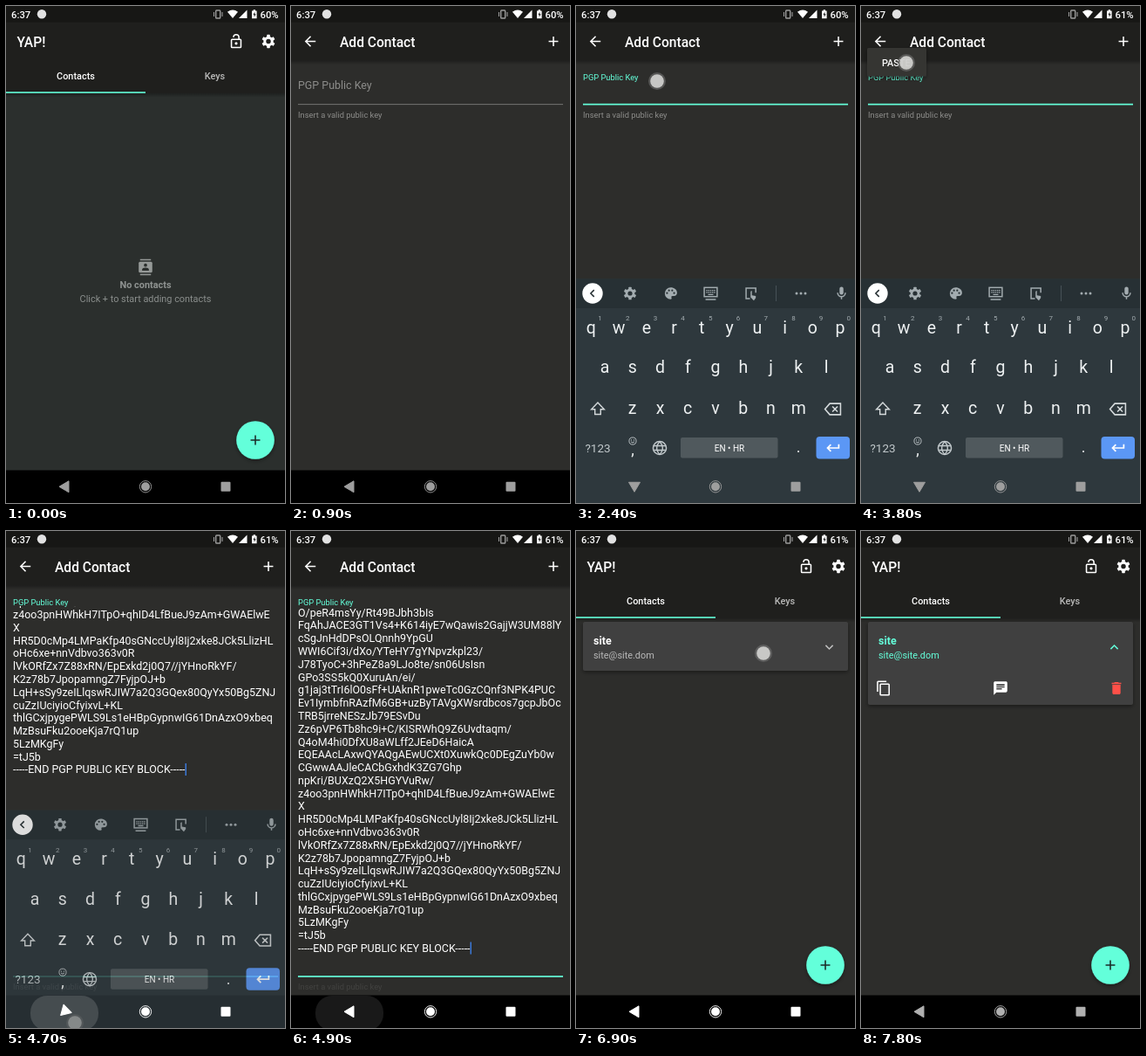
Animation of 320 by 569 pixels, one loop 8000 ms. Source, as an HTML page:

```html
<!DOCTYPE html>
<html lang="en">
<head>
<meta charset="utf-8">
<title>Adding a contact</title>
<style>
html, body { margin: 0; width: 100%; height: 100%; overflow: hidden; background: #000; }
svg { display: block; width: 100%; height: 100%; font-family: Roboto, "Liberation Sans", sans-serif; }
text { white-space: pre; }
</style>
</head>
<body>
<svg id="stage" viewBox="0 0 320 569"></svg>
<script>
const LOOP = 8000, TEAL = '#64ffda', DP = 320 / 411;
const LINE = 14.78, LAST = 493;

// ---- markup helpers: y is the middle of the capitals ----
const text = (x, y, s, size, fill, more = '') =>
  `<text x="${x}" y="${(y + size * 0.356).toFixed(2)}" font-size="${size}" fill="${fill}" ${more}>${s}</text>`;
const mid = 'text-anchor="middle"', medium = 'font-weight="500"', bold = 'font-weight="700"';
const rect = (x, y, w, h, fill, more = '') =>
  `<rect x="${x}" y="${y}" width="${w}" height="${h}" fill="${fill}" ${more}/>`;
const circle = (x, y, r, fill, more = '') => `<circle cx="${x}" cy="${y}" r="${r}" fill="${fill}" ${more}/>`;
const path = (d, more = '') => `<path d="${d}" ${more}/>`;
const line = (d, w = 2) => path(d, `fill="none" stroke="currentColor" stroke-width="${w}"`);
const icon = (x, y, body, color, scale = DP) =>
  `<g transform="translate(${x} ${y}) scale(${scale}) translate(-12 -12)" fill="${color}" color="${color}">${body}</g>`;
const group = (id, body, more = '') => `<g id="${id}" ${more}>${body}</g>`;

const tooth = i => rect(9.7, 2.2, 4.6, 4.5, 'currentColor', `rx="0.8" transform="rotate(${i * 60} 12 12)"`);
const ICON = {
  gear: [0, 1, 2, 3, 4, 5].map(tooth).join('') +
    circle(12, 12, 5.4, 'none', 'stroke="currentColor" stroke-width="3.8"'),
  lock: rect(5, 9, 14, 12, 'none', 'rx="1" stroke="currentColor" stroke-width="2"') +
    circle(12, 15, 2, 'currentColor') + line('M8 6a4 4 0 0 1 8 0v3'),
  back: path('M20 11H7.83l5.59-5.59L12 4l-8 8 8 8 1.41-1.41L7.83 13H20z'),
  add: path('M19 13h-6v6h-2v-6H5v-2h6V5h2v6h6z'),
  more: path('M16.59 8.59L12 13.17 7.41 8.59 6 10l6 6 6-6z'),
  copy: line('M3 17V3q0-1 1-1h12') + rect(7, 6, 13, 16, 'none', 'rx="1" stroke="currentColor" stroke-width="2"'),
  message: path('M20 2H4c-1.1 0-2 .9-2 2v18l4-4h14c1.1 0 2-.9 2-2V4c0-1.1-.9-2-2-2zM6 9h12v2H6zm8 5H6v-2h8zm4-6H6V6h12z',
    'fill-rule="evenodd"'),
  bin: path('M6 19c0 1.1.9 2 2 2h8c1.1 0 2-.9 2-2V7H6zM19 4h-3.5l-1-1h-5l-1 1H5v2h14z'),
  contacts: path('M4 0h16v2H4zM4 22h16v2H4z') + rect(2, 4, 20, 16, 'currentColor', 'rx="2"') +
    circle(12, 9, 2.4, '#2b2f2d') + path('M7 17v-1.5c0-4 10-4 10 0V17z', 'fill="#2b2f2d"'),
  palette: path('M12 3a9 9 0 0 0 0 18c1.5 0 2-1.3 1.4-2.4-.7-1.3.1-2.6 1.6-2.6h2a5 5 0 0 0 5-5c0-4.4-4.5-8-10-8z') +
    [[6.5, 11.5], [9.5, 7.5], [14.5, 7.5], [17.5, 11.5]].map(p => circle(p[0], p[1], 1.5, '#273034')).join(''),
  keyboard: rect(2, 3, 20, 14, 'none', 'stroke="currentColor" stroke-width="2"') +
    line('M5 7.5h14M5 10.5h14', 1.8).replace('/>', ' stroke-dasharray="2 1"/>') + line('M8 13.8h8M4 21.5h16', 1.8),
  touch: line('M10 20H4V4h15v7') + path('M11 9l2-1v7l6 1v3l-3 4-5-5z'),
  mic: rect(9, 2, 6, 12, 'currentColor', 'rx="3"') + line('M6 11a6 6 0 0 0 12 0M12 17v4'),
  shift: line('M12 3.5L3 13h5v7h8v-7h5z', 1.7),
  erase: line('M8 4.5h14.5v15H8L1.5 12zM11.5 8.5l7 7M18.5 8.5l-7 7', 1.8),
  globe: circle(12, 12, 9, 'none', 'stroke="currentColor" stroke-width="1.7"') +
    line('M12 3q-8 9 0 18M12 3q8 9 0 18M4 9h16M4 15h16', 1.6),
  enter: line('M20 7v5H5M9.5 7.5L5 12l4.5 4.5', 2),
  smile: circle(12, 12, 9, 'none', 'stroke="currentColor" stroke-width="2"') +
    circle(8.7, 9.5, 1.5, 'currentColor') + circle(15.3, 9.5, 1.5, 'currentColor') + line('M7.5 14q4.5 4.5 9 0')
};

const KEY = `DJRFNm+dpklWWP3Fo+PFkvFDsqTOwE0EXt0XuwEIA
O/peR4msYy/Rt49BJbh3bIs
FqAhJACE3GT1Vs4+K614iyE7wQawis2GajjW3UM88lY
cSgJnHdDPsOLQnnh9YpGU
WWI6Cif3i/dXo/YTeHY7gYNpvzkpl23/
J78TyoC+3hPeZ8a9LJo8te/sn06UsIsn
GPo3SS5kQ0XuruAn/ei/
g1jaj3tTrI6lO0sFf+UAknR1pweTc0GzCQnf3NPK4PUC
Ev1IymbfnRAzfM6GB+uzByTAVgXWsrdbcos7gcpJbOc
TRB5jrreNESzJb79ESvDu
Zz6pVP6Tb8hc9i+C/KISRWhQ9Z6Uvdtaqm/
Q4oM4hi0DfXU8aWLff2JEeD6HaicA
EQEAAcLAxwQYAQgAEwUCXt0XuwkQc0DEgZuYb0w
CGwwAAJleCACbGxhdK3ZG7Ghp
npKri/BUXzQ2X5HGYVuRw/
z4oo3pnHWhkH7ITpO+qhID4LfBueJ9zAm+GWAElwE
X
HR5D0cMp4LMPaKfp40sGNccUyl8Ij2xke8JCk5LlizHL
oHc6xe+nnVdbvo363v0R
lVkORfZx7Z88xRN/EpExkd2j0Q7//jYHnoRkYF/
K2z78b7JpopamngZ7FyjpOJ+b
LqH+sSy9zeILlqswRJIW7a2Q3GQex80QyYx50Bg5ZNJ
cuZzIUciyioCfyixvL+KL
thlGCxjpygePWLS9Ls1eHBpGypnwIG61DnAzxO9xbeq
MzBsuFku2ooeKja7rQ1up
5LzMKgFy
=tJ5b
-----END PGP PUBLIC KEY BLOCK-----`.split('\n');

// ---- scenes ----
const bars = h => rect(0, 0, 320, h, '#1f1f1d', 'class="bar"') + rect(0, 0, 320, 18.7, '#171715') +
  rect(0, h, 320, 5, 'url(#shade)');

const card = group('card',
  rect(8, 104, 304, 95, '#414141', 'id="cardBox" rx="2.5" filter="url(#drop)"') +
  `<g clip-path="url(#cardClip)">` +
  circle(215, 140, 0, '#fff', 'id="cardRipple"') +
  text(20, 126, 'site', 12.46, TEAL, bold + ' id="name"') +
  text(20, 142, 'site@site.dom', 10.9, TEAL, 'id="mail"') +
  group('chevron', icon(0, 0, ICON.more, 'currentColor')) +
  group('actions', icon(26, 180, ICON.copy, '#fff') + icon(160, 180, ICON.message, '#fff') +
    icon(293, 180, ICON.bin, '#ff5048')) + '</g>');

const home = rect(0, 0, 320, 532, '#2d2d2b', 'id="homeBack"') + bars(99.7) +
  text(12.5, 41, 'YAP!', 15.57, '#fff', medium) +
  icon(264, 40.5, ICON.lock, '#fff') + icon(301, 40.5, ICON.gear, '#fff') +
  text(80, 80.5, 'Contacts', 10.9, '#fff', medium + mid.padStart(30)) +
  text(239.5, 80.5, 'Keys', 10.9, '#b9b9b8', medium + mid.padStart(30)) +
  rect(0, 98.2, 160, 1.6, TEAL) +
  group('empty', icon(160, 299, ICON.contacts, '#959997') +
    text(160, 319.5, 'No contacts', 10.9, '#8f9391', mid + ' ' + bold) +
    text(160, 335.5, 'Click + to start adding contacts', 10.9, '#8b8f8d', mid)) +
  card +
  circle(286, 497, 21.8, TEAL, 'filter="url(#drop)"') + circle(286, 497, 21.8, '#fff', 'id="fabRipple"') +
  icon(286, 497, ICON.add, '#1c2b27');

const editor = rect(0, 0, 320, 532, '#2d2d2b') + bars(62.3) +
  icon(22, 40.5, ICON.back, '#fff') + text(56, 41, 'Add Contact', 15.57, '#fff', medium) +
  circle(301, 41, 27, '#fff', 'id="addRipple"') + icon(301, 40.5, ICON.add, '#fff') +
  group('label', text(0, 0, 'PGP Public Key', 12.46, 'currentColor')) +
  rect(8, 112, 304, 1, '#777', 'id="rule"') +
  group('helper', text(8, 0, 'Insert a valid public key', 9.34, '#8c8c8a')) +
  rect(8, 92, 1.5, 14, '#3a78d8', 'id="caret"') +
  `<g clip-path="url(#textClip)">` + group('pasted',
    KEY.map((s, i) => text(8, LAST - (KEY.length - 1 - i) * LINE, s, 12.46, '#fff')).join('') +
    rect(205.5, 486, 1.5, 14, '#3a78d8')) + '</g>' +
  group('menu', rect(7, 48, 68, 32.5, '#343432', 'rx="1.5" filter="url(#drop)"') +
    text(24, 65.5, 'PASTE', 10.9, '#fff', medium));

const row = (keys, x0, y) => [...keys].map((k, i) =>
  text((x0 + i * 31.75).toFixed(1), y, k, 19.5, '#eef1f2', mid)).join('');
const soft = '#a3acb0';
const board = rect(0, 312.5, 320, 310, '#2e383d') + rect(0, 312.5, 320, 33.5, '#273034') +
  circle(19, 329, 11.7, '#fff') + icon(19, 329, line('M14.5 6.5L9 12l5.5 5.5', 2.2), '#273034', 0.7) +
  [['gear', 62], ['palette', 108.5], ['keyboard', 154.5], ['touch', 201], ['mic', 304.5]]
    .map(p => icon(p[1], 329, ICON[p[0]], soft, 0.74)).join('') +
  rect(229, 320, 1, 18, '#465157') + [253, 258, 263].map(x => circle(x, 329, 1.5, soft)).join('') +
  row('qwertyuiop', 17.3, 368.2) + row('asdfghjkl', 33, 413.5) + row('zxcvbnm', 64.7, 460) +
  [...'1234567890'].map((d, i) => text(27.5 + i * 31.7, 357.5, d, 8, soft, mid)).join('') +
  icon(25, 461, ICON.shift, '#d5dadc', 0.82) + icon(294.5, 461.5, ICON.erase, '#d5dadc', 0.85) +
  text(25, 506, '?123', 13.5, '#c3cacd', mid) + text(65, 508, ',', 18, '#eef1f2', mid) +
  icon(65, 498, ICON.smile, '#c3cacd', 0.45) + icon(96, 506, ICON.globe, '#c3cacd', 0.84) +
  rect(120, 494, 111.5, 23.5, '#50595d', 'rx="2"') + text(176, 506, 'EN • HR', 10, '#fff', mid) +
  text(255, 505, '.', 18, '#eef1f2', mid) +
  rect(275.5, 493, 38.5, 25.5, '#5b97f5', 'rx="4"') + icon(294.5, 506, ICON.enter, '#fff', 0.86);

const nav = rect(28, 532, 78, 40, '#fff', 'id="pill" rx="19"') +
  group('navIcons',
    group('navBack', path('M-6 0L5 -6.5V6.5z', 'fill="currentColor" stroke="currentColor" stroke-linejoin="round"')) +
    circle(160, 550.3, 5, 'currentColor') +
    circle(160, 550.3, 6.7, 'none', 'stroke="currentColor" stroke-width="0.9"') +
    rect(246.5, 544.8, 11, 11, 'currentColor', 'rx="1"'));

const status = text(6, 9.7, '6:37', 11.3, '#fff', medium) + circle(41, 9.3, 5.2, '#e2e2e2') +
  rect(240.7, 5, 5, 9, 'none', 'rx="0.8" stroke="#9c9c9b" stroke-width="1.4"') +
  path('M238.5 7v5M248 7v5', 'stroke="#9c9c9b" stroke-width="1.1"') +
  path('M254 6.7q6-4.6 12 0l-6 7.3z', 'fill="#fff"') + path('M276.5 4.5v9.5h-9.5z', 'fill="#fff"') +
  path('M282 5.5h1.6v-1.2h2.4v1.2h1.6v8.7h-5.6z', 'fill="#fff"') +
  path('M285.4 6.6l-2 3.6h1.3v2.6l2-3.6h-1.3z', 'fill="#222"') +
  text(291.5, 9.7, '60%', 11.3, '#fff', medium + ' id="battery"');

document.getElementById('stage').innerHTML = `<defs>
  <linearGradient id="shade" x2="0" y2="1"><stop stop-color="#000" stop-opacity=".32"/><stop offset="1" stop-opacity="0"/></linearGradient>
  <filter id="drop" x="-20%" y="-20%" width="140%" height="150%"><feDropShadow dx="0" dy="2" stdDeviation="2" flood-opacity=".4"/></filter>
  <clipPath id="textClip"><rect id="textWindow" x="0" y="86" width="320" height="195"/></clipPath>
  <clipPath id="cardClip"><rect id="cardWindow" x="8" y="104" width="304" height="95"/></clipPath></defs>` +
  group('home', home) + group('editor', editor) + rect(0, 531.5, 320, 38, '#000') +
  group('board', board) + nav + status +
  group('touch', circle(0, 0, 10, '#777', 'opacity=".55"') + circle(0, 0, 7.8, '#d4d4d2', 'opacity=".9"'));

// ---- motion ----
const el = {};
document.querySelectorAll('[id]').forEach(e => el[e.id] = e);
const set = (id, attrs) => { for (const k in attrs) el[id].setAttribute(k, attrs[k]); };
const ramp = (t, a, b) => Math.min(1, Math.max(0, (t - a) / (b - a)));
const out = x => 1 - (1 - x) ** 3;
const smooth = x => x * x * (3 - 2 * x);
const lerp = (a, b, p) => a + (b - a) * p;
const mix = (a, b, p) => `rgb(${a.map((v, i) => Math.round(lerp(v, b[i], p)))})`;
const teal = [100, 255, 218];
const ripple = (t, a, peak, end, top) => t < a ? 0 : top * ramp(t, a - 50, peak) * (1 - ramp(t, peak, end));
const move = (x, y) => `translate(${x} ${y})`;

// start, release, x, y
const TAPS = [[500, 620, 290, 500], [1700, 1820, 93, 86], [2400, 3150, 93, 86], [3700, 3820, 52, 65],
  [4600, 4650, 79, 563], [5900, 5960, 303, 35], [6900, 7020, 215, 140]];

function drawHome(t) {
  const saved = t > 4000, open = smooth(ramp(t, 7050, 7300)), h = lerp(56, 95, open);
  set('homeBack', { fill: saved ? '#2d2d2b' : '#2b2f2d' });
  set('empty', { opacity: saved ? 0 : 1 });
  set('card', { opacity: saved ? 1 : 0 });
  set('cardBox', { height: h });
  set('cardWindow', { height: h });
  set('actions', { opacity: open });
  set('name', { fill: mix([255, 255, 255], teal, open) });
  set('mail', { fill: mix([185, 185, 185], teal, open) });
  set('chevron', { transform: `translate(290.5 133) rotate(${180 * open})`, color: mix([190, 190, 190], teal, open) });
  set('cardRipple', { r: 240 * out(ramp(t, 6900, 7300)), opacity: ripple(t, 6900, 7100, 7500, 0.1) });
  set('fabRipple', { opacity: ripple(t, 500, 620, 850, 0.3) });
}

function drawEditor(t) {
  const shown = t < 5000 ? ramp(t, 590, 880) : 1 - ramp(t, 6060, 6300);
  set('editor', { transform: move(0, 142 * (1 - out(shown))), opacity: smooth(shown) });
  const focus = smooth(ramp(t, 1780, 1980)), pasted = t >= 3980, grown = t >= 4680;
  set('label', {
    transform: move(8, lerp(90.3, 82, focus)) + ` scale(${lerp(1, 0.75, focus)})`,
    color: mix([140, 140, 138], teal, focus)
  });
  const y = grown ? 510 : pasted ? 291 : 112.6, w = lerp(1, 1.7, focus);
  set('rule', { y: y - w / 2, height: w, fill: mix([115, 115, 113], teal, focus) });
  set('helper', { transform: move(0, y + 12), opacity: 1 - ramp(t, 4720, 4950) });
  const blink = (t >= 1900 && t < 2400) || (t >= 2850 && t < 3350);
  set('caret', { opacity: blink ? 1 : 0 });
  const grow = out(ramp(t, 4760, 5000));
  set('pasted', { opacity: pasted ? 1 : 0, transform: move(0, -220 * (1 - grow)) });
  set('textWindow', { height: lerp(195, 416, grow) });
  set('menu', { opacity: ramp(t, 3150, 3350) * (1 - ramp(t, 3880, 4020)) });
  set('addRipple', { opacity: ripple(t, 5900, 6000, 6250, 0.16) });
}

function drawSystem(t) {
  const hidden = t < 3000 ? 1 - out(ramp(t, 1780, 2080)) : ramp(t, 4600, 4850) ** 2;
  set('board', { transform: move(0, 44 * hidden), opacity: 1 - hidden });
  const turn = t < 3000 ? smooth(ramp(t, 1780, 2050)) : 1 - smooth(ramp(t, 4600, 4800));
  set('navBack', { transform: move(67, 550.3) + ` rotate(${-90 * turn})` });
  const v = t < 4600 ? 158 : Math.round(lerp(255, 176, ramp(t, 7300, 7800)));
  set('navIcons', { color: `rgb(${v},${v},${v})` });
  set('pill', { opacity: ripple(t, 4600, 4720, 5200, 0.16) });
  el.battery.textContent = t < 2800 ? '60%' : '61%';
  const tap = TAPS.find(p => t >= p[0] && t < p[1] + 100);
  set('touch', tap
    ? { transform: move(tap[2], tap[3]), opacity: 1 - ramp(t, tap[1], tap[1] + 100) }
    : { opacity: 0 });
}

function render(t) {
  drawHome(t);
  drawEditor(t);
  drawSystem(t);
}

const start = performance.now();
function tick() {
  render((performance.now() - start) % LOOP);
  requestAnimationFrame(tick);
}
tick();
</script>
</body>
</html>
```
